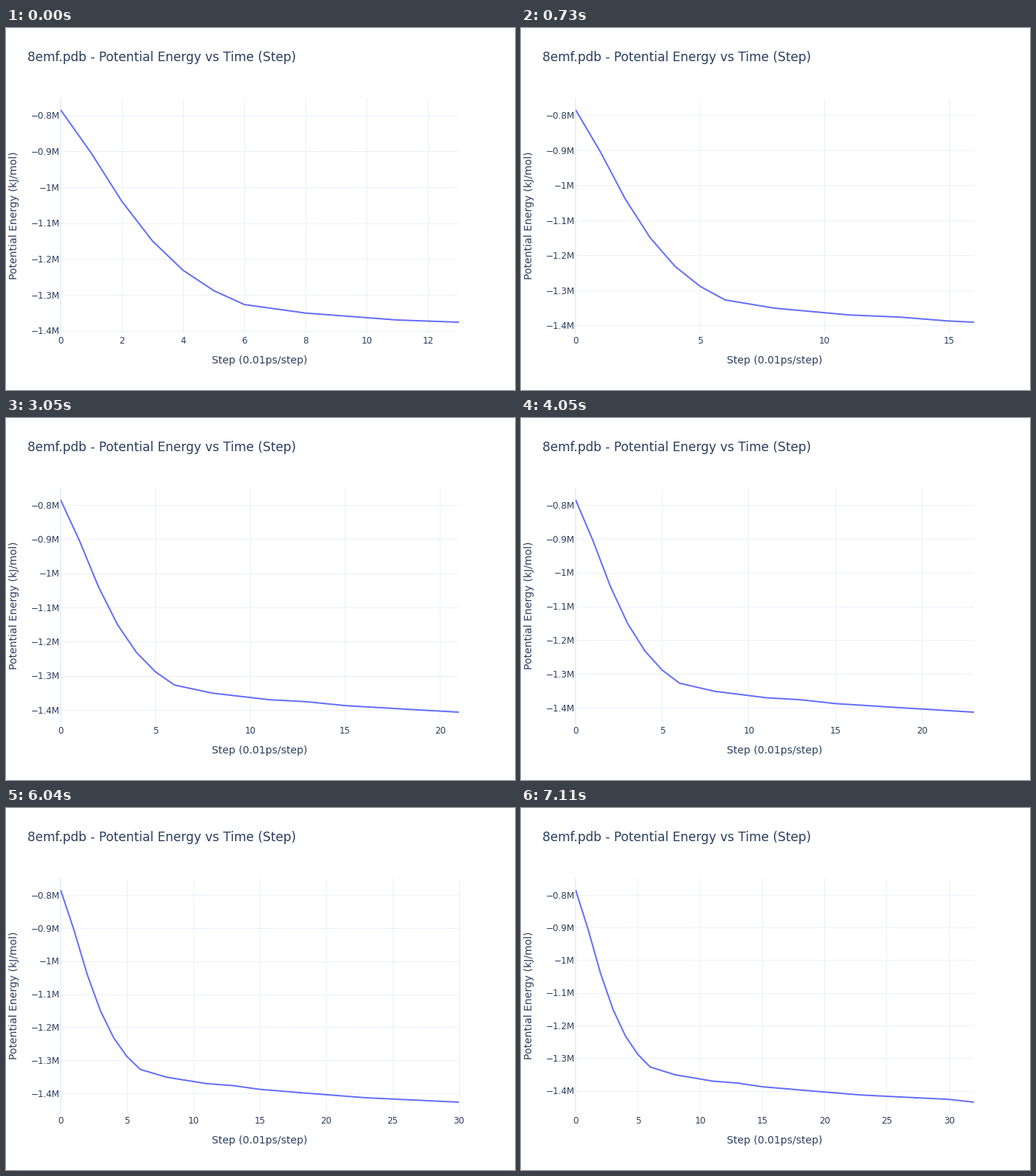
Write a matplotlib script that moves like this. It is 690 px wide and 491 px high and loops after 8000 ms.

```python
import math

import matplotlib.pyplot as plt
import numpy as np
from matplotlib.animation import FuncAnimation
from matplotlib.collections import LineCollection
from matplotlib.patches import Rectangle

W, H, DPI = 690, 491, 64
PT = 72 / DPI  # points per pixel
LEFT, RIGHT, TOP, BOTTOM = 74, 614, 95, 415
PAD = 0.05 * (BOTTOM - TOP)
LOOP, STEP = 8000, 20

INK, GRID, TRACE = "#2a3f5f", "#ebf0f8", "#636efa"

# Step reached, keyed by the time in ms at which the plot refreshes
REACHED = {0: 13, 730: 16, 1790: 18, 3050: 21,
           4050: 23, 5110: 28, 6040: 30, 7110: 32}
Y_TICKS = -np.arange(8, 15) / 10


def energy(step):
    """Potential energy in MJ/mol: a steep fall, then a slow settling."""
    fall = -0.7835 - 0.6 * (1 - np.exp(-0.224 * step ** 1.305))
    settle = np.interp(step, [6, 8, 11, 13, 15, 19, 23, 30, 32],
                       [-1.326, -1.3497, -1.369, -1.375, -1.3863,
                        -1.3993, -1.4117, -1.425, -1.4335])
    return np.where(step < 6, fall, settle)


plt.rcParams["font.family"] = "DejaVu Sans"
fig = plt.figure(figsize=(W / DPI, H / DPI), dpi=DPI, facecolor="white")
ax = fig.add_axes([0, 0, 1, 1])
ax.set(xlim=(0, W), ylim=(H, 0))
ax.axis("off")


def label(x, y, text="", size=12, ha="center", **kw):
    return ax.text(x, y, text, size=size * PT, color=INK, ha=ha,
                   va="baseline", zorder=4, **kw)


label(29, 45, "8emf.pdb - Potential Energy vs Time (Step)", 17, ha="left")
label(344, 455, "Step (0.01ps/step)", 14)
label(15, 254, "Potential Energy (kJ/mol)", 14, rotation=90,
      rotation_mode="anchor")

grid = ax.add_collection(LineCollection([], colors=GRID, linewidths=PT, zorder=1))
grid.set_snap(False)
ax.add_patch(Rectangle((LEFT - 1, TOP), 2, BOTTOM - TOP, fc=GRID, lw=0, zorder=2))
trace, = ax.plot([], [], color=TRACE, lw=2 * PT, solid_joinstyle="miter",
                 solid_capstyle="butt", zorder=3)
trace.set_clip_path(Rectangle((LEFT, TOP), RIGHT - LEFT, BOTTOM - TOP,
                              transform=ax.transData))
x_labels = [label(0, 428) for _ in range(7)]
y_labels = [label(73, 0, f"{v:g}M".replace("-", "\u2212"), ha="right")
            for v in Y_TICKS]


def crisp(v):
    """Centre of the pixel that holds v."""
    return math.floor(v) + 0.5


def draw(i):
    t = (i + 0.5) * STEP
    last = max(n for start, n in REACHED.items() if start <= t)
    steps = np.arange(last + 1)
    data = energy(steps)
    scale = (BOTTOM - TOP - 2 * PAD) / (data[0] - data[-1])

    def to_x(step):
        return LEFT + step * (RIGHT - LEFT) / last

    def to_y(value):
        return TOP + PAD + (data[0] - value) * scale

    trace.set_data(to_x(steps), to_y(data))

    x_ticks = steps[::2 if last <= 13 else 5]
    xs = [crisp(to_x(s)) for s in x_ticks[1:]]
    ys = [crisp(to_y(v)) for v in Y_TICKS]
    grid.set_segments([[(x, TOP), (x, BOTTOM)] for x in xs]
                      + [[(LEFT, y), (RIGHT, y)] for y in ys])

    for text in x_labels:
        text.set_text("")
    for text, s in zip(x_labels, x_ticks):
        text.set(x=to_x(s), text=str(s))
    for text, v in zip(y_labels, Y_TICKS):
        text.set_y(to_y(v) + 4.2)
    return [grid, trace, *x_labels, *y_labels]


anim = FuncAnimation(fig, draw, frames=LOOP // STEP, interval=STEP,
                     init_func=lambda: draw(0), repeat=True, repeat_delay=0)
plt.show()
```
